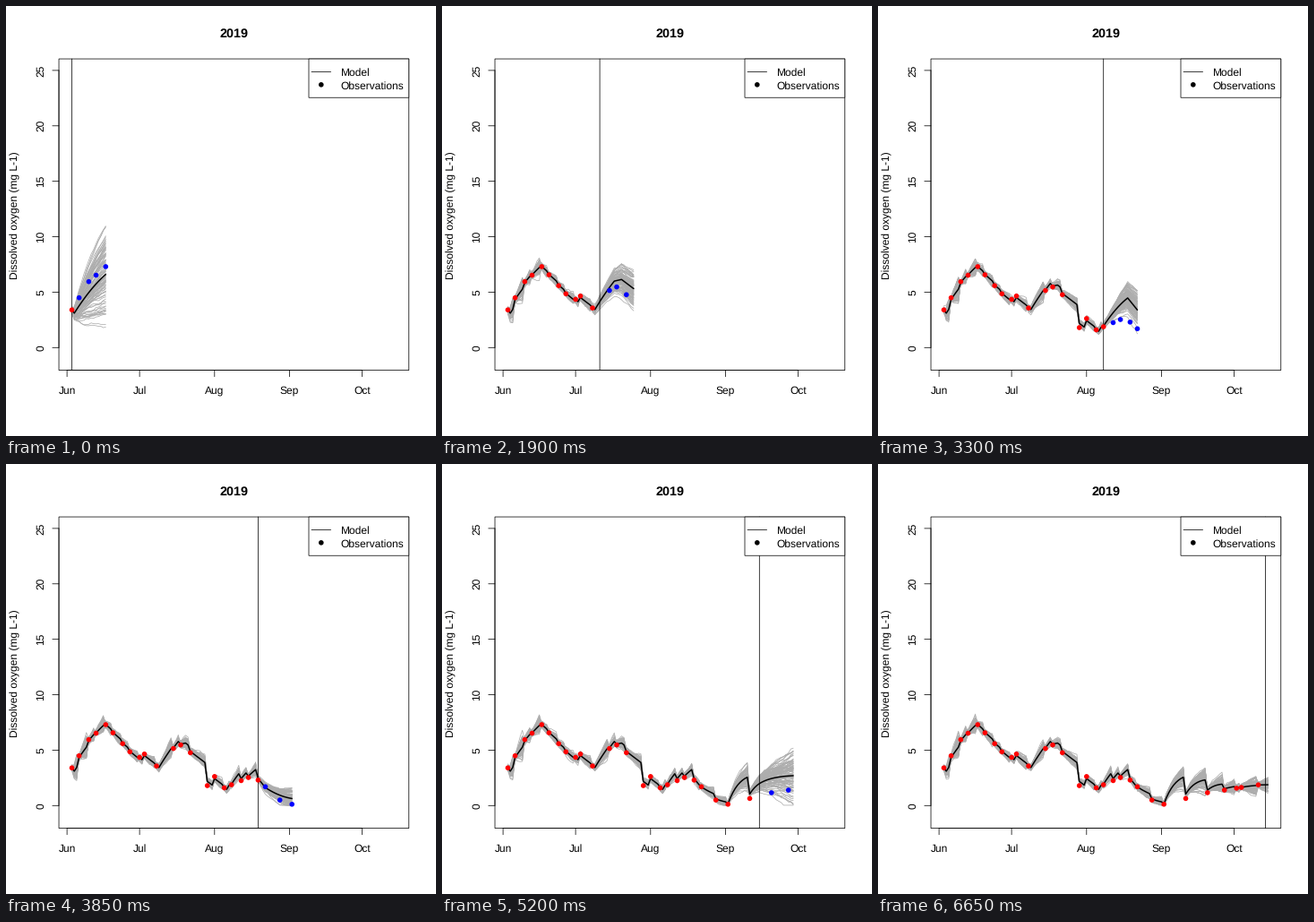
A matplotlib script for the animation above (6700 ms loop, 480 px wide and 480 px high).

```python
import numpy as np
import matplotlib.pyplot as plt
from matplotlib.animation import FuncAnimation
from matplotlib.collections import LineCollection
from matplotlib.patches import Rectangle

SIZE, DPI = 480, 100
PX = 72 / DPI                 # points per pixel
STEP = 50
LAST, HORIZON, MEMBERS = 134, 14, 100
LEFT, RIGHT, TOP, BOTTOM = 59.04, 449.76, 59.04, 406.56
THIN = 0.75

plt.rcParams.update({"font.family": "Liberation Sans", "path.snap": False,
                     "text.hinting": "none"})

# Day 0 is 3 June. Sampling twice a week, sparser in autumn.
SAMPLED = [30 if d == 31 else d for d in range(81)
           if d % 7 in (0, 3) and d not in (38, 52)]
SAMPLED += [86, 91, 100, 109, 116, 121, 123, 130]

# Turning points of the measured oxygen: (day, mg/L)
KEYS = [(0, 3.4), (7, 5.95), (14, 7.3), (24, 4.85), (28, 4.35), (30, 4.65),
        (35, 3.57), (42, 5.15), (45, 5.47), (49, 4.77), (56, 1.8), (59, 2.62),
        (63, 1.6), (73, 2.53), (77, 2.3), (86, 0.5), (91, 0.12),
        (109, 1.16), (130, 1.87)]
OBS = dict(zip(SAMPLED, np.interp(SAMPLED, *zip(*KEYS))))

# Model phases up to the autumn mixing: (last day, first rate, last rate)
PHASES = [(1, -.3, -.3), (14, .34, .2), (36, -.2, -.16), (44, .36, .28),
          (47, .05, .05), (64, -.165, -.165), (76, .36, .18),
          (80, -.27, -.27), (91, -.14, -.04)]
GAIN = 0.8                    # weight of an observation in the update


def px(day):
    return 73.51 + 2.7 * np.asarray(day, float)


def py(value):
    return 381.3 - 12.376 * np.asarray(value, float)


def drift(day, value, now):
    """Change of the model mean from the day before."""
    start = 0
    for end, first, last in PHASES:
        if day <= end:
            return first + (last - first) * (day - start - 1) / max(end - start - 1, 1)
        start = end
    level = np.clip(3.65 - 0.068 * (min(day - 1, now) - 91), 1.9, 3.6)
    return 0.16 * (level - value)


def simulate(now):
    """Mean and members, updated by observations up to now."""
    rng = np.random.default_rng(500 + now)
    days = np.arange(min(now + HORIZON, LAST) + 1)
    mean = np.zeros(len(days))
    dev = np.zeros((len(days), MEMBERS))
    mean[0] = OBS[0]
    for d in days:
        rate = drift(d, mean[d - 1], now)
        if d:
            mean[d] = max(mean[d - 1] + rate, 0.12)
        if d in OBS and d <= now:
            mean[d] += GAIN * (OBS[d] - mean[d])
            dev[d] = 0.13 * rng.normal(size=MEMBERS)
            slope = rng.normal(size=MEMBERS).clip(-2.3, 2.3)
        else:
            growth = (0.06 if rate > 0 else 0.03) + 0.19 * np.exp(-d / 8)
            dev[d] = dev[d - 1] + slope * growth + 0.07 * rng.normal(size=MEMBERS)
    return days, mean, np.maximum(mean[:, None] + dev, 0.03)


fig = plt.figure(figsize=(SIZE / DPI, SIZE / DPI), dpi=DPI, facecolor="white")
ax = fig.add_axes([0, 0, 1, 1])
ax.set_xlim(0, SIZE)
ax.set_ylim(SIZE, 0)
ax.axis("off")


def line(xs, ys, z=6, width=THIN):
    return ax.plot(xs, ys, color="black", lw=width * PX, zorder=z,
                   solid_capstyle="round", solid_joinstyle="round")[0]


def strokes(color, width, z):
    group = LineCollection([], colors=color, linewidths=width * PX, zorder=z,
                           capstyle="round", joinstyle="round")
    return ax.add_collection(group, autolim=False)


def dots(color, z=5):
    return strokes(color, 5.7, z)


def place(group, xs, ys):
    """Round dots at exact positions, as very short strokes."""
    group.set_segments([[(x, y), (x + 0.01, y)] for x, y in zip(xs, ys)])


def text(x, y, label, size=12, **kw):
    ax.text(x, y, label, fontsize=size * PX, va="baseline",
            rotation_mode="anchor", zorder=9, **kw)


def box(x0, y0, x1, y1, z, fill):
    ax.add_patch(Rectangle((x0, y0), x1 - x0, y1 - y0, facecolor=fill,
                           edgecolor="black", lw=THIN * PX, zorder=z))


# Frame, axes and labels
box(LEFT, TOP, RIGHT, BOTTOM, 6, "none")
months = {"Jun": -2, "Jul": 28, "Aug": 59, "Sep": 90, "Oct": 120}
line(px([-2, 120]), [BOTTOM] * 2)
line([LEFT] * 2, py([0, 25]))
for name, day in months.items():
    line([px(day)] * 2, [BOTTOM, BOTTOM + 7.2])
    text(px(day), 433, name, ha="center")
for v in range(0, 30, 5):
    line([LEFT - 7.2, LEFT], [py(v)] * 2)
    text(42, py(v), str(v), ha="center", rotation=90)
text(254.4, 35, "2019", 14.4, ha="center", weight="bold")
text(13.4, 233.3, "Dissolved oxygen (mg L-1)", ha="center", rotation=90)

# Legend
box(338, TOP, RIGHT, 102.24, 7, "white")
line([341, 362.6], [73.44] * 2, 8)
place(dots("black", 8), [351.8], [87.84])
text(373.4, 78, "Model")
text(373.4, 92.7, "Observations")

members = strokes("#adadad", THIN, 2)
mean_line = line([], [], 3, 1.5)
now_line = line([], [], 4)
past, future = dots("red"), dots("blue")


def update(now):
    days, mean, runs = simulate(now)
    x = px(days)
    members.set_segments([np.column_stack([x, py(run)]) for run in runs.T])
    mean_line.set_data(x, py(mean))
    now_line.set_data([px(now)] * 2, [TOP, BOTTOM])
    day, value = np.array(list(OBS.items())).T
    done = day <= now
    ahead = ~done & (day <= now + HORIZON)
    for group, pick in ((past, done), (future, ahead)):
        place(group, px(day[pick]), py(value[pick]))
    return members, mean_line, now_line, past, future


anim = FuncAnimation(fig, update, frames=LAST, interval=STEP, repeat=True,
                     repeat_delay=0, blit=False)
plt.show()
```
